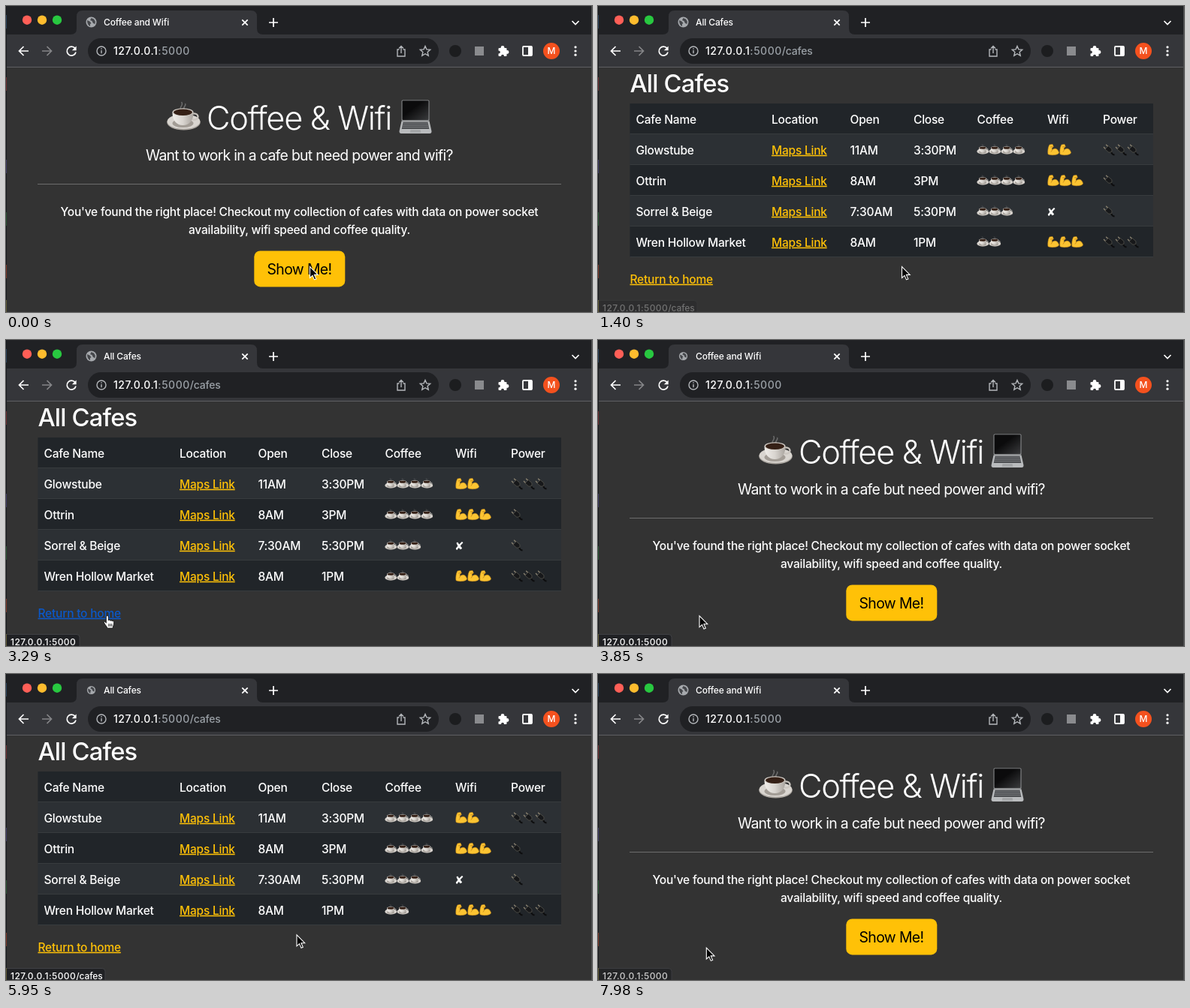
Animation of 780x408 px, one loop 8000 ms. Source, as an HTML page:

```html
<!DOCTYPE html>
<html lang="en">
<head>
<meta charset="utf-8">
<title>Coffee and Wifi</title>
<style>
  html, body { margin: 0; width: 100%; height: 100%; overflow: hidden; background: #333; }
  svg { display: block; width: 780px; height: 408px; }
  text { font-family: Inter, "Open Sans", sans-serif; font-optical-sizing: none; fill: #fff; white-space: pre; }
  .body { font-size: 15.5px; font-weight: 500; letter-spacing: -.215px; }
  .mid { text-anchor: middle; }
  .hero { font-size: 43.3px; font-weight: 300; letter-spacing: -1.32px; }
  .lead { font-size: 19.4px; letter-spacing: -.69px; }
  .button { font-size: 19.4px; letter-spacing: -.63px; fill: #000; }
  .h1 { font-size: 32.7px; font-weight: 500; letter-spacing: -.82px; }
  .small { font-size: 12px; font-weight: 500; letter-spacing: -.13px; }
  .url { font-size: 14px; font-weight: 500; letter-spacing: -.2px; }
  .host { letter-spacing: .038em; }
  .dim { fill: #9aa0a6; }
  .cross { font: 15px "DejaVu Sans", sans-serif; }
  .link { fill: #ffc107; text-decoration: underline; }
  .line { fill: none; stroke: #fff; stroke-width: 1.7; }
  .grey { stroke: #b4b7bb; stroke-width: 1.4; }
</style>
</head>
<body>
<svg id="stage" viewBox="0 0 780 408"></svg>
<script>
const STEP = 70, LOOP = 8000;
const stage = document.getElementById('stage');
const $ = id => document.getElementById(id);

const text = (x, y, cls, str, id = '') =>
  `<text x="${x}" y="${y}" class="${cls}"${id && ` id="${id}"`}>${str}</text>`;
const rect = (x, y, w, h, fill, rx = 0, extra = '') =>
  `<rect x="${x}" y="${y}" width="${w}" height="${h}" rx="${rx}" fill="${fill}" ${extra}/>`;
const disc = (x, y, r, fill) => `<circle cx="${x}" cy="${y}" r="${r}" fill="${fill}"/>`;
const line = (d, cls = '') => `<path class="line ${cls}" d="${d}"/>`;
const repeat = (n, draw) => Array.from({ length: n }, (_, i) => draw(i)).join('');

const defs = `<defs>
  <linearGradient id="china">
    <stop offset="0" stop-color="#f0ede9"/><stop offset=".5" stop-color="#d9d5d0"/><stop offset="1" stop-color="#a8a39d"/>
  </linearGradient>
  <linearGradient id="screen" x2="1" y2="1">
    <stop offset=".4" stop-color="#0b0b0c"/><stop offset="1" stop-color="#3a3b3d"/>
  </linearGradient>
  <g id="cup">
    <path d="M-3-9c-5-4 4-6 0-11M1-10c-3-3 3-5 1-8" fill="none" stroke="#858585" stroke-width="1.5" opacity=".7"/>
    <ellipse cy="7" rx="22.3" ry="10.5" fill="#aaa59f"/>
    <ellipse cy="6" rx="21.8" ry="9.8" fill="#d9d5d0"/>
    <ellipse cx="-1" cy="8.5" rx="14" ry="5.5" fill="#a39d96"/>
    <ellipse cx="14" cy="-.5" rx="5" ry="4.2" fill="none" stroke="#cbc6c0" stroke-width="2.3"/>
    <path d="M-15-6C-15 5-9 11-1 11S13 5 13-6Z" fill="url(#china)"/>
    <ellipse cx="-1" cy="-6.6" rx="14" ry="5.2" fill="#d0cbc5"/>
    <ellipse cx="-1" cy="-6.2" rx="12.4" ry="4.2" fill="#352016"/>
  </g>
  <g id="arm">
    <path d="M3 1.5 7 1 8.3 4 6 6l.5 2.7C9 5.5 14 6 15.5 12 15 15.5 4 16 1 14 .5 10 1 5 3 1.5Z" fill="#fcc432" stroke="#d8981c" stroke-width=".6"/>
    <path d="M4 4.5 7.5 4M6.5 8.7 5 11" fill="none" stroke="#c27f16" stroke-width=".8"/>
  </g>
  <g id="plug" fill="none">
    <path d="M1 4.5l3 3M4.2 1.2l3 3" stroke="#8b8371" stroke-width="1.3"/>
    <path d="M11 11q1 3.5 4.5 4" stroke="#0d0d0e" stroke-width="2"/>
    <path d="M3 7.5 7.2 3 12 7.2 11.8 11 8 11.8Z" fill="#17181a" stroke="#54524c" stroke-width=".8"/>
  </g>
</defs>`;

const laptop = `<g transform="translate(523 125)">
  ${rect(3.5, .5, 37, 28, '#8f9193', 1.5)}${rect(4.5, 1.3, 35, 25.8, 'url(#screen)', 1)}
  <path d="M3.5 28.5H40.5L43.5 42Q43.5 45 41 45H3Q.5 45 .5 42Z" fill="#b9bbbd"/>
  <path d="M5.5 29.8H38.5L40.3 39H3.7Z" fill="#4b4d50"/>
  <path d="M5.2 32H38.8M4.8 34.3H39.2M4.3 36.6H39.7" stroke="#8b8d90" stroke-width=".7"/>
  <path d="M15.5 40H28.5L29.3 43.8H14.7Z" fill="#a3a5a7"/></g>`;

const home = `<g id="home">
  <use href="#cup" x="236.5" y="148"/>${laptop}
  ${text(390, 165, 'hero mid', 'Coffee &amp; Wifi')}
  ${text(390.3, 205.5, 'lead mid', 'Want to work in a cafe but need power and wifi?')}
  ${rect(42, 237, 697, 1, '#6c6c6c')}
  ${text(390.5, 280, 'body mid', "You've found the right place! Checkout my collection of cafes with data on power socket")}
  ${text(390.5, 304, 'body mid', 'availability, wifi speed and coffee quality.')}
  ${rect(330.3, 326.4, 121, 48, '#ffc107', 8, 'id="button"')}
  ${text(390.5, 357.5, 'button mid', 'Show Me!')}</g>`;

const columns = [50.5, 231, 335.5, 420, 504.5, 598, 672];
const headings = ['Cafe Name', 'Location', 'Open', 'Close', 'Coffee', 'Wifi', 'Power'];
const shops = [
  ['Glowstube', '11AM', '3:30PM', 4, 2, 3],
  ['Ottrin', '8AM', '3PM', 4, 3, 1],
  ['Sorrel &amp; Beige', '7:30AM', '5:30PM', 3, 0, 1],
  ['Wren Hollow Market', '8AM', '1PM', 2, 3, 3],
];
const icons = (name, n, x, y) => repeat(n, i => `<use href="#${name}" x="${x + 16 * i}" y="${y}"/>`);
const cups = (n, x, y) => repeat(n, i =>
  `<use href="#cup" transform="translate(${x + 7.8 + 16 * i} ${y + 8}) scale(.355)"/>`);

function shopRow([name, open, close, coffee, wifi, power], i) {
  const top = 171 + 41 * i, base = top + 26.7, icon = top + 12.5;
  const [cName, cMap, cOpen, cClose, cCoffee, cWifi, cPower] = columns;
  return rect(42.5, top, 696.5, 41, i % 2 ? '#212529' : '#2c3034')
    + rect(42.5, top + 40, 696.5, 1, '#373b3e')
    + text(cName, base, 'body', name) + text(cMap, base, 'body link', 'Maps Link')
    + text(cOpen, base, 'body', open) + text(cClose, base, 'body', close)
    + cups(coffee, cCoffee, icon)
    + (wifi ? icons('arm', wifi, cWifi, icon) : text(cWifi - 1, base, 'cross', '✘'))
    + icons('plug', power, cPower, icon);
}

const cafes = `<g id="cafes">
  ${text(42.5, 115, 'h1', 'All Cafes')}
  ${rect(42.5, 130, 696.5, 41, '#212529')}${rect(42.5, 170, 696.5, 1, '#373b3e')}
  ${headings.map((h, i) => text(columns[i], 156.7, 'body', h)).join('')}
  ${shops.map(shopRow).join('')}
  ${text(42.5, 369.7, 'body link', 'Return to home', 'back')}</g>`;

const tabBar = rect(0, 0, 780, 38, '#202124')
  + ['#ff5f57', '#febc2e', '#28c840'].map((c, i) => disc(28 + 20 * i, 18.7, 6.2, c)).join('')
  + `<path d="M86 38q8 0 8-8V14q0-8 8-8H326q8 0 8 8V30q0 8 8 8Z" fill="#35363a"/>
  <g id="globe">${disc(0, 0, 7, '#a6a9ad')}
    <path d="M-5.5-2.5 -2-1 0 1.5-1.5 2.5V5.5Q-5.5 4-5.5-2.5ZM0-5.5 3.5-4 5.3-1 5 2.5 2.5 1.5 1-1.5-1.5-2.5Z" fill="#45474b"/></g>`
  + text(130, 26, 'small', '', 'tab')
  + line('M314.3 18.3l7.4 7.4m0-7.4l-7.4 7.4') + line('M350 22h12m-6-6v12')
  + line('M753.5 20l4.5 4.5 4.5-4.5');

const toolbar = rect(0, 38, 780, 43, '#35363a') + rect(0, 81, 780, 1, '#5e5f62')
  + line('M30 60H17.5m6-6-6 6 6 6')
  + `<g opacity=".4">${line('M48 60H60.5m-6-6 6 6-6 6')}</g>`
  + line('M92 56.5A6 6 0 1 0 93 61.5') + `<path d="M93.6 53.5V59.3H87.8Z" fill="#fff"/>`
  + rect(109, 43, 467, 34, '#202124', 17)
  + line('M133 60a6 6 0 1 1-12 0a6 6 0 1 1 12 0M127 59v4.3M127 56.3v1.5', 'grey')
  + text(143, 65, 'url', '<tspan class="host">127.0.0.1<tspan class="dim">:5000</tspan></tspan><tspan id="path" class="dim"></tspan>')
  + line('M523.5 58H521V67H531V58H528.5M526 63V53.5m-3 3 3-3 3 3', 'grey')
  + line('M558 53.5l1.9 4.4 4.8.4-3.6 3.2 1.1 4.7-4.2-2.5-4.2 2.5 1.1-4.7-3.6-3.2 4.8-.4Z', 'grey')
  + disc(598, 60, 8, '#1c1d1f') + rect(624, 54, 12, 12, '#8a8b8e')
  + rect(655.5, 56, 11, 11, '#fff', 1) + disc(661, 55.5, 2.4, '#fff') + disc(667, 61.5, 2.4, '#fff')
  + disc(655.8, 61.5, 2, '#35363a') + disc(661, 66.8, 2, '#35363a')
  + rect(688, 54, 12, 12, 'none', 1, 'stroke="#fff" stroke-width="1.8"') + rect(695, 54, 5, 12, '#fff')
  + disc(726, 60, 11, '#f4511e') + text(726, 64.4, 'small mid', 'M')
  + repeat(3, i => disc(758, 54.8 + 5.2 * i, 1.6, '#fff'));

const edges = rect(0, 0, 1, 408, '#16191d') + rect(779, 0, 1, 408, '#4b4c4e')
  + [[12, '#29425c'], [95, '#6b2b2e'], [205, '#3c3a63'], [275, '#24502f'], [345, '#7a3526'], [392, '#5f5a35']]
    .map(([y, c]) => rect(0, y, 1, 18, c)).join('');

const status = `<g id="status">${rect(-6, 392.5, 104, 24, '#202124', 4, 'id="bubble" stroke="#404145"')}
  ${text(6, 407, 'small', '<tspan class="host">127.0.0.1:5000</tspan><tspan id="address"></tspan>')}</g>`;

const pointer = `<g id="pointer">
  <circle id="ring" r="31.5" fill="none" stroke="#000" stroke-width="2.5" opacity=".8"/>
  <path id="arrow" d="M0 0V15L3.5 11.8 6 17.4 8.3 16.4 5.9 10.9H10.7Z" fill="#000" stroke="#fff" stroke-width="1.1"/>
  <g id="hand" stroke="#111" stroke-width=".9">
    <path d="M-1.7 9.5V1.2a1.5 1.5 0 0 1 3 0V6.2c.2-1 2.6-1 2.8.4c.5-.9 2.4-.6 2.6.6c.6-.6 2-.2 2 1.2c0 4-1.2 5-1.6 8H-.1c-.5-2-3.2-4.6-4.4-7.2c-.7-1.6 1-2.4 2.8.3Z" fill="#fff"/>
    <path d="M1.8 10.5v3.6m2-3.6v3.6m2-3.6v3.6"/></g></g>`;

stage.innerHTML = defs + rect(0, 0, 780, 408, '#333') + home + cafes + tabBar + toolbar + status + edges + pointer;

// Timeline in ms
const pageLoads = [1190, 3850, 5950, 7700];
const clicks = [[1120, 1190], [3640, 3780], [5740, 5880], [7630, 7700]];
const moves = [
  [2310, 3010, [135, 367.8]],
  [4410, 5250, [387, 347.8]],
  [6300, 7000, [144.3, 365]],
];
const statusFade = [
  [1120, 0], [1190, .8], [1330, .6], [1400, .3], [1470, 0], [3150, 0], [3290, 1], [4060, 1], [4340, 0],
  [5390, 0], [5600, 1], [6160, 1], [6440, 0], [7140, 0], [7420, 1], [7910, 1], [8190, 0],
];

const clamp = v => Math.min(1, Math.max(0, v));
const smooth = v => v * v * (3 - 2 * v);
const show = (id, on) => $(id).setAttribute('display', on ? 'inline' : 'none');

function ramp(keys, t) {
  let [t0, v0] = keys[0];
  for (const [t1, v1] of keys) {
    if (t < t1) return v0 + (v1 - v0) * clamp((t - t0) / (t1 - t0));
    [t0, v0] = [t1, v1];
  }
  return v0;
}

function pointerAt(t) {
  let pos = [404.5, 347.5];
  for (const [start, end, to] of moves) {
    const k = smooth(clamp((t - start) / (end - start)));
    pos = pos.map((v, i) => v + (to[i] - v) * k);
  }
  return pos;
}

function render(time) {
  const t = Math.floor(time / STEP) * STEP;
  const onCafes = pageLoads.filter(p => t >= p).length % 2 === 1;
  const [x, y] = pointerAt(t);
  const overLink = onCafes && x < 154 && y > 355;
  const overButton = !onCafes && t > 4000 && x > 330 && x < 451;
  const hand = onCafes ? overLink : t >= 5320 && t < 5950;

  show('home', !onCafes);
  show('cafes', onCafes);
  $('tab').textContent = onCafes ? 'All Cafes' : 'Coffee and Wifi';
  $('path').textContent = onCafes ? '/cafes' : '';
  $('globe').setAttribute('transform', `translate(113.5 21.5) scale(${pageLoads.includes(t) ? .8 : 1})`);
  $('button').setAttribute('fill', overButton ? '#ffca2c' : '#ffc107');
  $('back').style.fill = overLink ? '#0a58ca' : '';

  const toCafes = t < 1500 || (t > 5300 && t < 6500);
  $('status').setAttribute('opacity', ramp(statusFade, t));
  $('bubble').setAttribute('width', toCafes ? 138 : 104);
  $('address').textContent = toCafes ? '/cafes' : '';

  $('pointer').setAttribute('transform', `translate(${x} ${y})`);
  show('hand', hand);
  show('arrow', !hand);
  show('ring', clicks.some(([a, b]) => t >= a && t < b));
}

const began = performance.now();
function tick() {
  render((performance.now() - began) % LOOP);
  requestAnimationFrame(tick);
}
tick();
</script>
</body>
</html>
```
